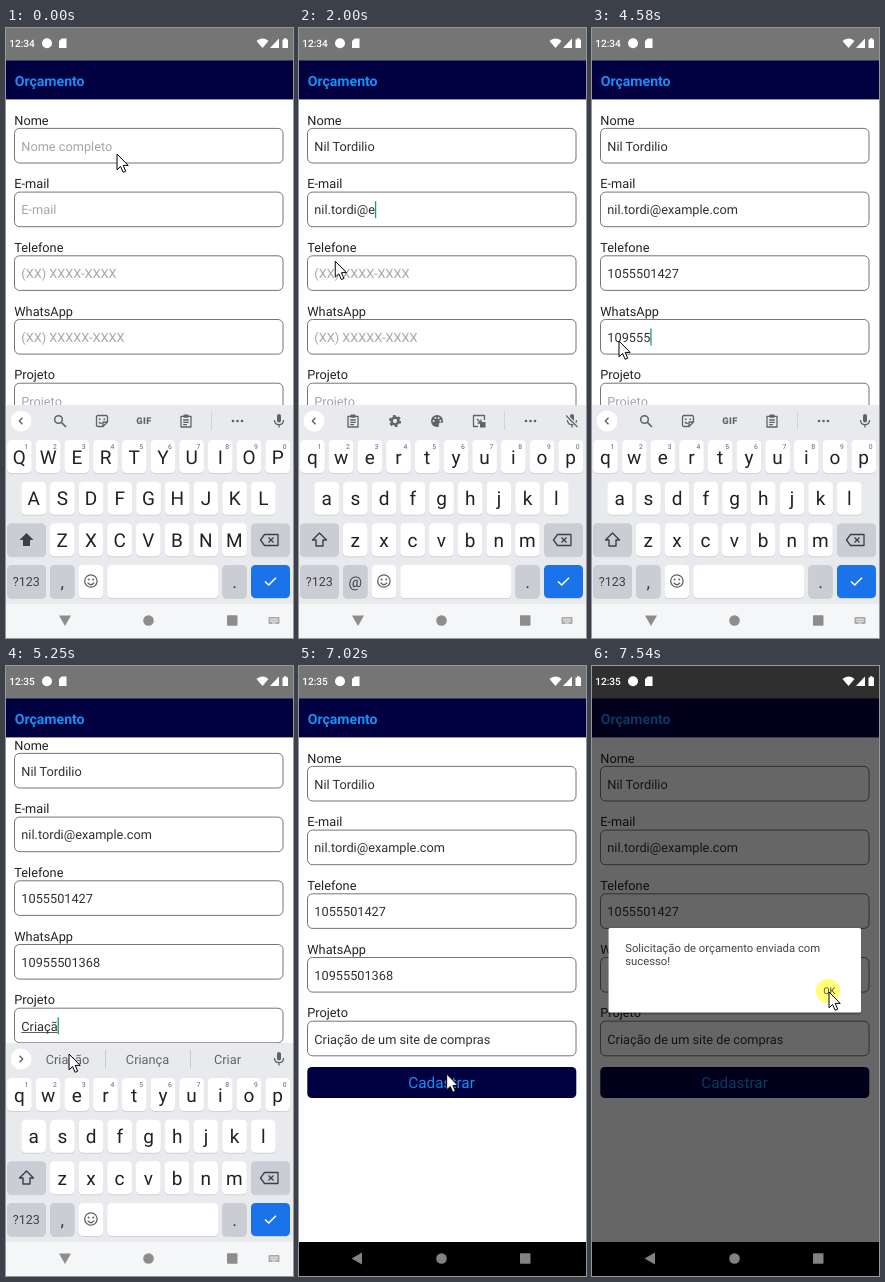
An HTML page that plays this animation: 287x610 px, repeating every 7620 ms.

```html
<!DOCTYPE html>
<html lang="pt-BR">
<head>
<meta charset="utf-8">
<title>Orçamento</title>
<style>
html, body { margin: 0; width: 100%; height: 100%; overflow: hidden; background: #fff; }
svg { display: block; width: 287px; height: 610px; font-family: Roboto, Arial, sans-serif; text-rendering: geometricPrecision; }
text { white-space: pre; }
</style>
</head>
<body>
<svg id="stage" viewBox="0 0 287 610"></svg>
<script>
const LOOP = 7620, STEP = 75, TEXT = 12.75;
const NAVY = '#000040', BLUE = '#1690f5', GREY = '#5f6368', TEAL = '#159a8c';
const stage = document.getElementById('stage');
const pen = document.createElement('canvas').getContext('2d');

// typing: [start, end, first count, last count]; focus: [from, until]
const fields = [
  { label: 'Nome', hint: 'Nome completo', value: 'Nil Tordilio', focus: [80, 1160], words: true,
    typing: [[80, 840, 1, 12]] },
  { label: 'E-mail', hint: 'E-mail', value: 'nil.tordi@example.com', focus: [1080, 3360],
    typing: [[1240, 1700, 1, 8], [1780, 2470, 9, 18], [2900, 3060, 19, 21]] },
  { label: 'Telefone', hint: '(XX) XXXX-XXXX', value: '1055501427', focus: [3360, 4200],
    typing: [[3500, 3720, 1, 5], [3890, 4050, 6, 10]] },
  { label: 'WhatsApp', hint: '(XX) XXXXX-XXXX', value: '10955501368', focus: [4200, 4960],
    typing: [[4280, 4580, 1, 6], [4660, 4820, 7, 11]] },
  { label: 'Projeto', hint: 'Projeto', value: 'Criação de um site de compras', focus: [4960, 7020], words: true,
    typing: [[5030, 5410, 1, 11], [5640, 5820, 12, 14], [6120, 6121, 16, 16], [6450, 6451, 18, 18], [6540, 6940, 19, 29]] }
];

// [start, end, x, y]
const moves = [
  [0, 0, 111, 126], [1000, 1080, 79, 177], [1780, 2010, 22, 252], [4120, 4200, 27, 313],
  [4820, 4960, 63, 388], [6940, 7100, 190, 418], [7180, 7240, 199, 460], [7310, 7460, 237, 326]
];

const suggestions = [
  [80, 'Nil', 'Não', 'Nem'], [390, 'e', 'da', 'de'], [460, 'Tordi', 'Tordilio', 'Tordil'],
  [5030, 'Criação', 'Criança', 'Criar'], [5330, 'de', 'do', 'da'], [5640, 'um', 'uma', 'novo'],
  [5820, 'site', 'I', 'app'], [6540, 'de', 'para', 'com'], [6700, 'compras', 'compra', 'compro']
];

const within = (t, [a, b]) => t >= a && t < b;
const latest = (list, t) => list.filter(item => item[0] <= t).pop();

const rect = (x, y, w, h, fill, r = 0, more = '') =>
  `<rect x="${x}" y="${y}" width="${w}" height="${h}" rx="${r}" fill="${fill}" ${more}/>`;
const circle = (x, y, r, fill, more = '') => `<circle cx="${x}" cy="${y}" r="${r}" fill="${fill}" ${more}/>`;
const shape = (d, fill) => `<path d="${d}" fill="${fill}"/>`;
const line = (d, color = GREY, w = 1.3) =>
  `<path d="${d}" fill="none" stroke="${color}" stroke-width="${w}" stroke-linejoin="round"/>`;
const text = (s, x, y, size, fill, more = '') =>
  `<text x="${x}" y="${y}" font-size="${size}" fill="${fill}" ${more}>${s}</text>`;
const at = (x, y, body) => `<g transform="translate(${x} ${y})">${body}</g>`;
const MIDDLE = 'text-anchor="middle"';

function widthOf(s) {
  pen.font = `${TEXT}px Roboto, Arial, sans-serif`;
  return pen.measureText(s).width;
}

function typedCount(typing, t) {
  const run = latest(typing, t);
  if (!run) return 0;
  const [a, b, from, to] = run;
  return from + Math.floor(Math.min(1, (t - a) / (b - a)) * (to - from) + 1e-6);
}

function pointer(t) {
  const i = moves.filter(m => m[0] <= t).length - 1;
  const [a, b, x, y] = moves[i];
  const [, , px, py] = moves[Math.max(0, i - 1)];
  const total = Math.round((b - a) / STEP) + 1;
  const p = Math.min(1, (Math.floor((t - a) / STEP) + 1) / total);
  return [px + (x - px) * p, py + (y - py) * p];
}

function drawField(f, i, t) {
  const y = 100 + i * 63.7;
  const value = f.value.slice(0, typedCount(f.typing, t));
  let out = text(f.label, 8.3, y - 3.5, TEXT, '#222') +
    rect(8.5, y + 0.4, 268.5, 34.6, '#fff', 5, 'stroke="#666" stroke-width=".9"') +
    text(value || f.hint, 15.3, y + 22.7, TEXT, value ? '#303030' : '#a6a6a6');
  if (within(t, f.focus)) {
    const end = 15.3 + widthOf(value);
    if (f.words) {
      const start = 15.3 + widthOf(value.slice(0, value.lastIndexOf(' ') + 1));
      out += rect(start, y + 24.3, end - start, 0.8, '#333');
    }
    out += rect(end, y + 9.5, 1.3, 17, i === 0 && t >= 1080 ? '#333' : TEAL);
  }
  return out;
}

const icons = {
  search: circle(-1.5, -1.5, 3.8, 'none', `stroke="${GREY}" stroke-width="1.5"`) + line('M1.5 1.5L6 6', GREY, 1.7),
  sticker: line('M-5.5-4Q-5.5-5.5-4-5.5H4Q5.5-5.5 5.5-4V1L1 5.5H-4Q-5.5 5.5-5.5 4ZM1 5.5V1H5.5M-3 1Q-1.5 3 0 2') +
    circle(-2.3, -1.8, 0.9, GREY) + circle(2.3, -1.8, 0.9, GREY),
  gif: text('GIF', 0, 3.3, 9.3, GREY, MIDDLE + ' font-weight="900" letter-spacing=".5"'),
  clipboard: line('M-5-4.7H5V6H-5ZM-2.8-1H2.8M-2.8 1.4H2.8M-2.8 3.6H1') + rect(-2.6, -6.5, 5.2, 3.3, GREY, 1),
  gear: circle(0, 0, 3.4, 'none', `stroke="${GREY}" stroke-width="2.5"`) +
    circle(0, 0, 5.2, 'none', `stroke="${GREY}" stroke-width="1.8" stroke-dasharray="2.7 2.75"`),
  palette: circle(0, 0, 6, GREY) + circle(4, 4, 2.4, '#e8eaed') +
    [[-3.4, 0], [-1.6, -3], [1.6, -3], [3.4, -0.3]].map(([x, y]) => circle(x, y, 1, '#e8eaed')).join(''),
  resize: line('M5.5-1V-5.5H-5.5V5.5H-1M-2-2L2 2M2-1.5V2H-1.5') + rect(1, 1, 5.5, 5.5, GREY),
  dots: [-4.5, 0, 4.5].map(x => circle(x, 0, 1.3, GREY)).join(''),
  mic: rect(-2, -7, 4, 8.5, GREY, 2) + line('M-4.5-1Q-4.5 3.7 0 3.7T4.5-1M0 3.7V6.5'),
  micOff: rect(-2, -7, 4, 8.5, GREY, 2) + line('M-4.5-1Q-4.5 3.7 0 3.7T4.5-1M0 3.7V6.5') +
    line('M-5.5-5.5L5.5 5.5', '#e8eaed', 3) + line('M-6-5.5L5.5 6')
};

const key = (x, y, w, fill = '#fff') => rect(x, y + 1, w, 33, '#d0d2d6', 4.5) + rect(x, y, w, 33, fill, 4.5);
const keyRow = (letters, x, y, upper) => [...letters].map((c, i) => {
  const cx = x + i * 28.7;
  return key(cx - 12.3, y, 24.6) + text(upper ? c.toUpperCase() : c, cx, y + 23.5, 19, '#202124', MIDDLE);
}).join('');

function drawStrip(t, email, suggesting) {
  let out = circle(15, 393, 10.5, '#fff') +
    line(suggesting ? 'M13.5 389.8L16.7 393L13.5 396.2' : 'M16.5 389.8L13.3 393L16.5 396.2', GREY, 1.4);
  if (suggesting) {
    out += latest(suggestions, t).slice(1).map((s, i) => text(s, 61.5 + i * 80, 397.5, TEXT, GREY, MIDDLE)).join('') +
      rect(99, 384, 1, 18, '#c8cace') + rect(184, 384, 1, 18, '#c8cace');
  } else {
    const names = email ? ['clipboard', 'gear', 'palette', 'resize'] : ['search', 'sticker', 'gif', 'clipboard'];
    out += names.map((n, i) => at(54 + i * 42, 393, icons[n])).join('') +
      rect(205, 384, 1, 18, '#d2d4d8') + at(231.5, 393, icons.dots);
  }
  return out + at(273, 393, icons[email ? 'micOff' : 'mic']);
}

function drawKeyboard(t) {
  const email = within(t, [1160, 3360]);
  const suggesting = within(t, [80, 1160]) || t >= 5030;
  const upper = [[0, 80], [3360, 3500], [4200, 4280], [4960, 5030]].some(span => within(t, span));
  const dark = '#cacdd3', ink = '#3c4043';
  const hints = [...'1234567890'].map((n, i) => text(n, 20.3 + i * 28.7, 420.5, 6.8, GREY, MIDDLE)).join('');
  const arrow = 'M20.5 505L27.5 512H24V518H17V512H13.5Z';
  return rect(0, 377, 287, 199, '#e8eaed') + drawStrip(t, email, suggesting) +
    keyRow('qwertyuiop', 13.4, 412, upper) + hints +
    keyRow('asdfghjkl', 27.7, 453.7, upper) + keyRow('zxcvbnm', 56.2, 495.3, upper) +
    key(1, 495.3, 39, dark) + (upper ? shape(arrow, ink) : line(arrow, ink, 1.4)) +
    key(245, 495.3, 39, dark) + line('M258.5 506.5H272V517.5H258.5L254.5 512ZM262.5 509.5L267.5 514.5M267.5 509.5L262.5 514.5', ink) +
    key(1, 537, 39, dark) + text('?123', 20.3, 558, 12.5, ink, MIDDLE) +
    key(44, 537, 24.6, dark) + text(email ? '@' : ',', 56.2, email ? 559 : 560, email ? 15 : 18, ink, MIDDLE) +
    key(72.6, 537, 24.6) + circle(84.9, 553, 6.2, 'none', `stroke="${GREY}" stroke-width="1.3"`) +
    circle(82.6, 551.4, 1, GREY) + circle(87.2, 551.4, 1, GREY) + line('M81.6 554.7Q84.9 558.8 88.2 554.7') +
    key(101.3, 537, 111) + key(216.2, 537, 24.6, dark) + text('.', 228.5, 560, 18, ink, MIDDLE) +
    key(245, 537, 39, '#1a73e8') + line('M259 553.5L262.7 557L270 549.7', '#fff', 1.6);
}

function drawNav(open) {
  const color = open ? '#8d8d8d' : '#828282';
  return rect(0, 576, 287, 34, open ? '#f5f6f8' : '#000') +
    shape(open ? 'M53 587.5H65L59 598Z' : 'M63 586.5V598.5L52.5 592.5Z', color) +
    circle(142.5, 592.5, 5.3, color) + rect(221, 587.3, 10.5, 10.5, color, 0.7) +
    (open ? rect(262.5, 589, 11, 7, '#aaa', 1) + line('M264 591.2H272M264 593.2H272', '#f5f6f8', 0.9) +
      line('M266 595H270', '#f5f6f8', 0.8) : '');
}

function drawStatus(t) {
  return text(t < 5030 ? '12:34' : '12:35', 3.2, 19, 10.1, '#fff', 'font-weight="500"') +
    circle(41, 15.3, 5, '#fff') + shape('M53 13L55.7 10.5H60.5V20H53Z', '#fff') +
    shape('M250.5 13Q256.5 8.2 262.5 13L256.5 20Z', '#fff') + shape('M273 10.5V20H264Z', '#fff') +
    shape('M276.5 11.5H278V10.2H280.5V11.5H282V20H276.5Z', '#fff');
}

function drawDialog() {
  return rect(16, 263.5, 253, 85, '#000', 2, 'opacity=".25"') + rect(16.5, 262, 252.5, 84.5, '#fff', 1.5) +
    text('Solicitação de orçamento enviada com', 33.2, 286, 11.3, '#444') + text('sucesso!', 33.2, 299.3, 11.3, '#444');
}

function render(t) {
  const open = t < 7020;
  const scroll = within(t, [4960, 7020]) ? -13 : 0;
  const pressed = within(t, [7240, 7310]);
  const alpha = t < 7310 ? 0 : t < 7390 ? 0.5 : 1;
  const button = `<g opacity="${pressed ? 0.2 : 1}">` + rect(8.3, 401, 269, 31, NAVY, 4.5) +
    text('Cadastrar', 142.6, 422.3, 15.3, BLUE, MIDDLE) + '</g>';
  const [x, y] = pointer(t);
  return rect(0, 0, 287, 610, '#fff') +
    at(0, scroll, fields.map((f, i) => drawField(f, i, t)).join('') + button) +
    rect(0, 71, 287, 1, '#000', 0, 'opacity=".15"') + rect(0, 32, 287, 39.3, NAVY) +
    text('Orçamento', 8.7, 57.7, 14.1, BLUE, 'font-weight="700"') + rect(0, 0, 287, 32.5, '#757575') +
    (open ? drawKeyboard(t) : '') + drawNav(open) +
    (alpha ? `<g opacity="${alpha}">` + rect(0, 0, 287, 576, '#000', 0, 'opacity=".6"') + drawDialog() + '</g>' : '') +
    (t >= 7540 ? circle(236, 325, 12, '#ffff78') : '') +
    (alpha ? text('OK', 231.2, 328.3, 9.3, '#444', `opacity="${alpha}"`) : '') +
    drawStatus(t) +
    at(x, y, '<path d="M0 0V15.8L3.6 12.5L6.1 18.3L8.7 17.2L6.2 11.4H11.2Z" fill="#fff" stroke="#000" stroke-width="1"/>');
}

let shown = '';
const began = performance.now();
function tick() {
  const picture = render((performance.now() - began) % LOOP);
  if (picture !== shown) stage.innerHTML = shown = picture;
  requestAnimationFrame(tick);
}
tick();
</script>
</body>
</html>
```
